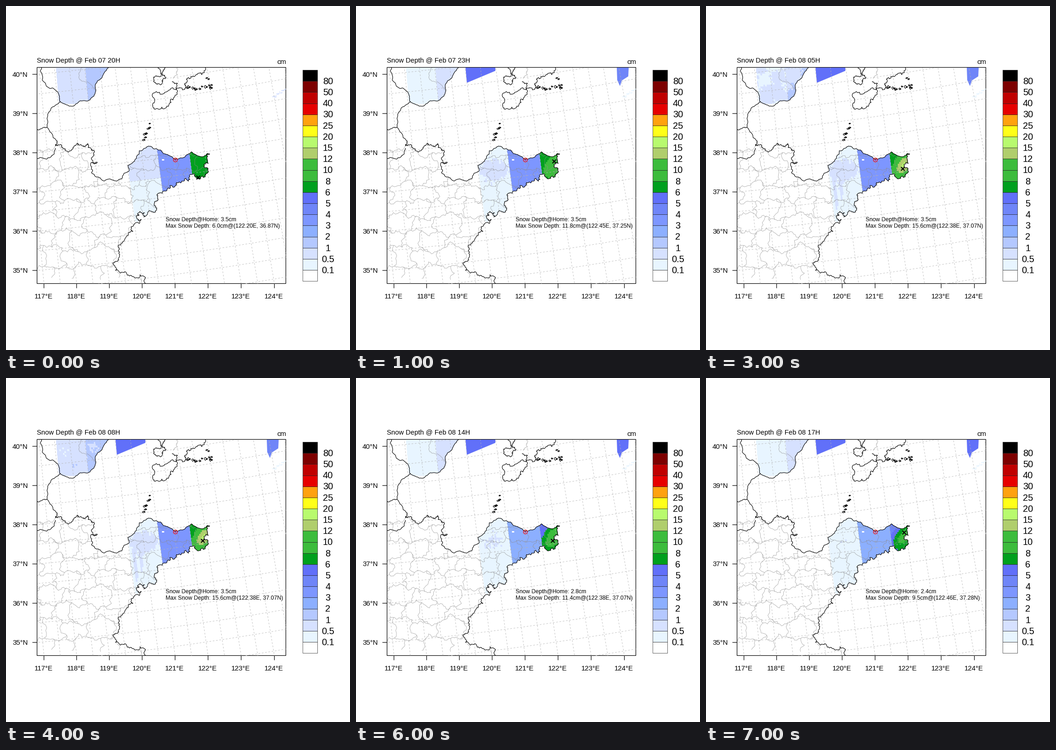
These frames come from a looping animation (748 px wide and 748 px high, 8 s). A matplotlib script:

```python
import numpy as np
import matplotlib.pyplot as plt
from matplotlib.animation import FuncAnimation
from matplotlib.collections import LineCollection
from matplotlib.patches import Polygon, Rectangle, Circle
from matplotlib.path import Path

SIZE, DPI = 748, 64
PT = 72 / DPI  # points per pixel
L, R, T, B = 67.5, 608.5, 133.5, 603.5
STEPS = 8
plt.rcParams["font.family"] = "Liberation Sans"

LEVELS = [.1, .5, 1, 2, 3, 4, 5, 6, 8, 10, 12, 15, 20, 25, 30, 40, 50, 80]
COLORS = ["#ffffff", "#e8f5ff", "#d6e1ff", "#b4c8ff", "#8cafff", "#7d96ff",
          "#6f85f8", "#6170f9", "#00a01e", "#3cbc3c", "#3cbc3c", "#b0ce6c",
          "#b8fa6e", "#ffff19", "#ffa20f", "#e60000", "#c00000", "#7d0000",
          "#000000"]
RGBA = plt.matplotlib.colors.to_rgba_array(COLORS)
RGBA[0, 3] = 0

# Greatest depth at each step, and where it lies
MAX_DEPTH = [6.0, 11.8, 15.5, 15.6, 15.6, 13.6, 11.4, 9.5]
MAX_PLACE = {0: (122.20, 36.87), 1: (122.45, 37.25), 7: (122.46, 37.28)}
USUAL_PLACE = (122.38, 37.07)


def home_depth(i):
    return min(3.5, 3.2 - .4 * (i - 5))


def project(lon, lat):
    """Lambert conformal position in stage pixels."""
    a = np.radians(.61 * (lon - 108.3))
    rho = 6181.1 + 84.92 * (40 - lat)
    return -531.2 + rho * np.sin(a), -6003.5 + rho * np.cos(a)


def rough(flat, amp=.15, seed=1, depth=4):
    """Fractal line through a few points given as x, y, x, y, ..."""
    rng = np.random.default_rng(seed)
    p = np.reshape(flat, (-1, 2)).astype(float)
    for _ in range(depth):
        d = np.diff(p, axis=0)
        side = np.c_[-d[:, 1], d[:, 0]] * rng.uniform(-amp, amp, (len(d), 1)) * 2
        out = np.empty((2 * len(p) - 1, 2))
        out[::2] = p
        out[1::2] = (p[:-1] + p[1:]) / 2 + side
        p = out
    return p


# Key points of the coast, from the top edge round the peninsula
GULF = [225, 133, 199, 163, 195, 186, 183, 204, 144, 218, 118, 208, 99, 221,
        89, 264, 109, 292]
DELTA = [109, 292, 108, 304, 123, 307, 146, 310, 168, 304, 178, 299, 185, 313,
         190, 326, 186, 350]
NORTH = [186, 350, 186, 363, 195, 371, 236, 380, 252, 376, 268, 356, 265, 347,
         303, 309, 312, 305, 328, 311, 341, 319, 367, 333, 389, 328, 403, 317,
         418, 326, 443, 322]
SOUTH = [443, 322, 437, 331, 440, 342, 433, 352, 439, 362, 432, 372, 415, 374,
         402, 366, 381, 384, 366, 394, 335, 406, 331, 420, 323, 428, 325, 448,
         300, 459, 292, 447, 284, 461, 294, 464]
EAST = [294, 464, 276, 490, 262, 500, 245, 531, 246, 539, 233, 558, 238, 575,
        268, 587, 304, 604]
COAST = np.vstack([rough(GULF, .07), rough(DELTA, .25, 2), rough(NORTH, .1, 3),
                   rough(SOUTH, .22, 4), rough(EAST, .17, 5)])
LAND = Path(np.vstack([COAST, [(L, B), (L, T)]]))

BORDERS = [[77, 133, 79, 159, 104, 180, 118, 208], [67, 268, 89, 264],
           [67, 332, 95, 330, 107, 309]]
CAPE = [433, 133, 402, 153, 388, 169, 389, 181, 365, 199, 355, 213, 322, 224,
        322, 211, 352, 185, 373, 168, 361, 164]
INLET = [325, 133, 339, 148, 321, 158, 326, 169, 340, 167, 348, 155, 341, 143,
         348, 133]
INLAND = [[166, 133, 159, 145, 164, 163, 196, 184], [373, 133, 371, 150, 364, 158]]

# Depth grid, one value per pixel, quantised into leaning model cells
X, Y = np.meshgrid(np.arange(L, R) + .5, np.arange(T, B) + .5)
U = X - .13 * (Y - 320)
COL, ROW = (U // 3.5).astype(int), (Y // 4).astype(int)
QX, QY = COL * 3.5 + 1.7 + .13 * (ROW * 4 - 318), ROW * 4 + 2.
NOISE = np.random.default_rng(8).normal(size=(200, 220))[ROW, COL]
WAVE = .6 * np.sin(QX / 9 + QY / 17) + .4 * np.sin(QY / 6 - QX / 13) + .3 * NOISE


def bell(i, mid, width):
    return np.exp(-((i - mid) / width) ** 2)


def blob(cx, cy, rx, ry):
    return bell(QX, cx, rx) * bell(QY, cy, ry)


def snow(i):
    """Coloured snow depth field of step i."""
    depth = np.zeros_like(X)
    first = i == 0
    fresh = bell(i, 3.8, 1.1)                 # second fall in the north west
    mixed = 0 if first else bell(i, 3.5, 2)   # how patchy thin snow is

    north, v = Y < 214, X - .085 * (Y - 134)
    vary = mixed * (.15 * WAVE + .3 * blob(158, 195, 35, 15))
    west = .32 + .32 * fresh + .38 * first + vary
    east = .7 + .4 * fresh + .8 * first + vary
    for lo, hi, level in [(108, 172, west), (172, 230, east)]:
        depth = np.where(north & (v >= lo) & (v < hi), level, depth)

    hill = .48 * min(1, (8.3 - i) / 4.5) * blob(299, 356, 36, 26)
    streak = .5 * mixed * blob(285, 408, 15, 36) * (.6 + .4 * np.sin(COL * 1.5))
    plain = np.maximum(.28 + hill + streak + .05 * NOISE, .15)
    if first:
        plain = np.where(Y < 382 - .11 * (X - 268), .7, .3)
    base = 6.6 if i < 5 else 5.3 - .3 * (i - 5)
    rise = max(0, MAX_DEPTH[i] - base)
    tip = base + rise * blob(430 - .4 * (QY - 347), 347, 18, 24)
    south = (Y > 300) & (Y < 470 - .12 * (X - 280))
    for lo, hi, level in [(260.8, 329, plain), (329, 398.3, home_depth(i)),
                          (398.3, 460, tip)]:
        depth = np.where(south & (U >= lo) & (U < hi), level, depth)

    depth[(abs(X - 341) < 2.2) & (abs(Y - 335) < 1.3)] = 0
    return RGBA[np.digitize(depth, LEVELS)]


fig = plt.figure(figsize=(SIZE / DPI, SIZE / DPI), dpi=DPI, facecolor="white")
page = fig.add_axes([0, 0, 1, 1])
page.set(xlim=(0, SIZE), ylim=(SIZE, 0))
page.axis("off")
ax = fig.add_axes([L / SIZE, 1 - B / SIZE, (R - L) / SIZE, (B - T) / SIZE])
ax.axis("off")
field = ax.imshow(snow(0), extent=(L, R, B, T), aspect="auto",
                  interpolation="nearest", zorder=1)
field.set_clip_path(LAND, ax.transData)
ax.set(xlim=(L, R), ylim=(B, T))


def lines(paths, color="black", lw=1.1, z=4, **kw):
    return ax.add_collection(LineCollection(paths, colors=color, lw=lw * PT,
                                            zorder=z, **kw), autolim=False)


def patch(flat, color):
    return ax.add_patch(Polygon(np.reshape(flat, (-1, 2)), color=color, lw=0, zorder=1))


def text(x, y, s, px, ha="left"):
    return page.text(x, y, s, size=px * PT, ha=ha, va="baseline")


# Sea cells along the top edge, and specks at the right
top_cell = patch([238, 133, 303, 133, 303, 141, 241, 167], COLORS[7])
side_cell = patch([567, 133, 593, 133, 592, 153, 578, 162, 574, 174, 568, 161],
                  COLORS[6])
rng = np.random.default_rng(3)
specks = [patch([x, y, x + w, y - 1, x + w, y + 1, x, y + 2], COLORS[2])
          for x, y, w in zip(np.linspace(579, 605, 13),
                             np.linspace(199, 181, 13) + rng.uniform(-3, 3, 13),
                             rng.uniform(2, 5, 13))]

# Graticule every half degree
lons, lats = np.arange(114, 127.1, .5), np.arange(33, 42.1, .5)
meridians = [np.c_[project(lon, np.linspace(33, 42, 30))] for lon in lons]
parallels = [np.c_[project(np.linspace(114, 127, 60), lat)] for lat in lats]
lines(meridians + parallels, "#b4b4b4", .8, 2, linestyles=[(0, (4.5, 4.5))])

# County lines: a jittered brick pattern, kept to the land
rng = np.random.default_rng(12)
knots = np.stack(np.meshgrid(np.arange(55, 470, 24), np.arange(318, 625, 35)), -1)
knots = knots + rng.uniform(-8, 8, knots.shape)
rows, cols = knots.shape[:2]
edges = []
for r in range(rows - 1):
    for c in range(cols - 1):
        edges.append((knots[r, c], knots[r, c + 1]))
        if (r + c) % 2:
            edges.append((knots[r, c], knots[r + 1, c]))
counties = lines([rough(e, .18, k, 3) for k, e in enumerate(edges)],
                 "#8c8c8c", .6, 3)
counties.set_clip_path(LAND, ax.transData)
lines([rough(p, .1) for p in INLAND], "#8c8c8c", .6, 3)

lines([COAST, rough(CAPE, .2, 70), rough(INLET, .2, 71)]
      + [rough(p, .1) for p in BORDERS])

# Island chains: start, end, count and scatter
for x0, y0, x1, y1, count, spread in [(397, 179, 452, 174, 12, 6),
                                      (312, 257, 299, 293, 7, 3),
                                      (437, 156, 441, 160, 2, 1)]:
    s = np.linspace(0, 1, count)
    at = np.c_[x0 + (x1 - x0) * s, y0 + (y1 - y0) * s]
    for x, y in at + rng.uniform(-spread, spread, at.shape):
        w = rng.uniform(1.5, 4)
        lines([rough([x - w, y, x, y - w * .6, x + w, y, x, y + w * .5, x - w, y],
                     .25, count, 2)])

# Home and the place of greatest depth
ax.add_patch(Circle((368.3, 334.7), 4.3, fill=False, ec="red", lw=1.2 * PT, zorder=6))
ax.add_patch(Circle((368.3, 334.7), 1.3, color="red", lw=0, zorder=6))
peak, = ax.plot([], [], "x", color="black", ms=8 * PT, mew=2 * PT, zorder=7)

# Frame, ticks and labels
ink = dict(color="black", lw=1.2 * PT, snap=False)
page.add_patch(Rectangle((L, T), R - L, B - T, fill=False, **ink))
for k in range(6):
    y = 575 - 85.3 * k
    page.plot([58, L], [y, y], **ink)
    text(47.5, y + 5, f"{35 + k}°N", 15, "right")
for k in range(STEPS):
    x = -531.2 + 6607 * np.tan(np.radians(.61 * (8.7 + k)))
    page.plot([x, x], [B, 613], **ink)
    text(x - 1, 636.3, f"{117 + k}°E", 15, "center")

# Colour key
BOX = 459.3 / len(COLORS)
for k, color in enumerate(COLORS):
    y = 598.3 - BOX * k
    page.add_patch(Rectangle((645.3, y - BOX), 32, BOX, fc=color, ec="#202020",
                             lw=.7 * PT))
    if k:
        text(700, y + 6.8, f"{LEVELS[k - 1]:g}", 20, "center")

text(609, 126, "cm", 15, "right")
title = text(67, 123.3, "", 14.75)
home = text(346.7, 467.7, "", 12.35)
most = text(346.7, 481.5, "", 12.35)


def update(i):
    day, hour = divmod(7 * 24 + 20 + 3 * i, 24)
    lon, lat = MAX_PLACE.get(i, USUAL_PLACE)
    field.set_data(snow(i))
    top_cell.set_visible(i > 0)
    side_cell.set_visible(i > 0)
    side_cell.set_facecolor(COLORS[6 if i < 5 else 7])
    for s in specks:
        s.set_facecolor(COLORS[1 if i else 2])
    x, y = project(lon, lat)
    peak.set_data([x - 1], [y])
    title.set_text(f"Snow Depth @ Feb {day:02d} {hour:02d}H")
    home.set_text(f"Snow Depth@Home: {home_depth(i):.1f}cm")
    most.set_text(f"Max Snow Depth: {MAX_DEPTH[i]:.1f}cm@({lon:.2f}E, {lat:.2f}N)")
    return []


anim = FuncAnimation(fig, update, frames=STEPS, interval=1000, repeat=True,
                     repeat_delay=0, init_func=lambda: update(0))
plt.show()
```
